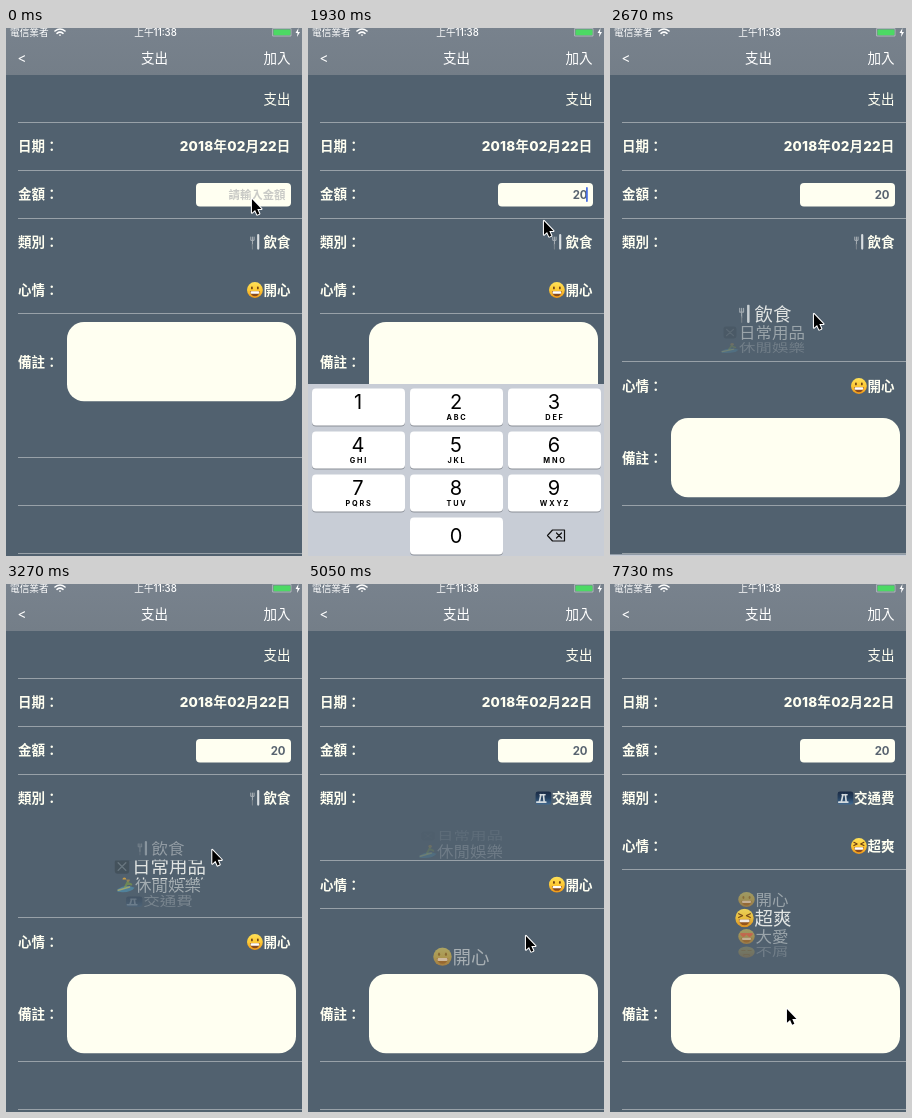
An HTML page with a canvas for the animation above (8 s loop, 296x528 px).

```html
<!DOCTYPE html>
<html lang="zh-Hant">
<head>
<meta charset="utf-8">
<title>支出</title>
<style>
  html, body { margin: 0; width: 100%; height: 100%; overflow: hidden; background: #51616f; }
  canvas { display: block; width: 296px; height: 528px; }
</style>
</head>
<body>
<canvas id="stage"></canvas>
<script>
const W = 296, H = 528, LOOP = 8000, TICK = 148.65;
const ROW = 48, OPEN = 2 * ROW, RIGHT = 284.5, SIZE = 13.5;
const IVORY = '#fffff1', BODY = '#51616f', LINE = '#98a1a8', BROWN = '#6b3d14';
const FONT = 'Inter, "Noto Sans CJK TC", "Noto Sans CJK", sans-serif';
const stage = document.getElementById('stage');
const ratio = window.devicePixelRatio || 1;
stage.width = W * ratio;
stage.height = H * ratio;
const c = stage.getContext('2d');

const categories = [['cutlery', '飲食'], ['goods', '日常用品'], ['surf', '休閒娛樂'], ['transit', '交通費'], ['plane', '旅遊']];
const moods = [['smile', '開心'], ['laugh', '超爽'], ['love', '大愛'], ['meh', '不屑']];

// Pointer legs: first tick, last tick, x, y.
const legs = [
  [11, 15, 225, 214], [16, 18, 203, 285], [19, 26, 209, 234], [27, 31, 217, 351],
  [35, 38, 197, 350], [39, 42, 197, 331], [45, 48, 190, 386], [49, 52, 176, 424]
];

function ease(k, from, to) {
  const f = Math.min(1, Math.max(0, (k - from) / (to - from)));
  return f * f * (3 - 2 * f);
}

function text(s, x, y, size = SIZE, { weight = 600, align = 'left', color = IVORY, spacing = 0 } = {}) {
  c.font = `${weight} ${size}px ${FONT}`;
  c.letterSpacing = spacing + 'px';
  c.textAlign = align;
  c.fillStyle = color;
  c.fillText(s, x, y + size * .37);
}

function box(x, y, w, h, r, color) {
  c.fillStyle = color;
  c.beginPath();
  c.roundRect(x, y, w, h, r);
  c.fill();
}

function stroke(d, color, width) {
  c.strokeStyle = color;
  c.lineWidth = width;
  c.lineCap = c.lineJoin = 'round';
  c.stroke(new Path2D(d));
}

function shape(d, color) {
  c.fillStyle = color;
  c.fill(new Path2D(d));
}

function disc(x, y, rx, ry, color) {
  c.fillStyle = color;
  c.beginPath();
  c.ellipse(x, y, rx, ry, 0, 0, Math.PI * 2);
  c.fill();
}

function fade(y0, y1, ...colors) {
  const g = c.createLinearGradient(0, y0, 0, y1);
  colors.forEach((color, i) => g.addColorStop(i / (colors.length - 1), color));
  return g;
}

function placed(x, y, sx, sy, paint) {
  c.save();
  c.translate(x, y);
  c.scale(sx, sy);
  paint();
  c.restore();
}

function clipped(y, h, paint) {
  if (h <= 0) return;
  c.save();
  c.beginPath();
  c.rect(0, y, W, h);
  c.clip();
  paint();
  c.restore();
}

// Draws one eye, mirrored for the other side.
function face(eye, happy = true) {
  disc(0, 0, .96, .96, fade(-1, 1, '#ffe25a', '#fdc935', '#ee9417'));
  for (const side of [-1, 1]) placed(side * .36, -.25, side, 1, eye);
  if (!happy) return stroke('M-.35 .5Q0 .3 .35 .5', BROWN, .15);
  shape('M-.6 .15H.6Q.5 .75 0 .75T-.6 .15Z', '#8a4a1c');
  box(-.52, .15, 1.04, .3, .1, '#fff');
}

// Every icon fits the square from -1 to 1.
const icons = {
  smile: () => face(() => disc(0, 0, .11, .18, BROWN)),
  laugh: () => face(() => stroke('M.25 -.2L-.15 0L.25 .2', BROWN, .13)),
  love: () => face(() => shape('M0 .35Q-.8 -.3 0 -.2Q.8 -.3 0 .35Z', '#e8343f')),
  meh: () => face(() => stroke('M-.2 0H.2', BROWN, .15), false),
  cutlery() {
    stroke('M-.5 -.6V-.2H-.1V-.6M-.3 -.6V.4', '#aab2b8', .12);
    stroke('M-.3 .3V.85', '#78828a', .14);
    stroke('M.4 -.85V.8', '#d9dee1', .26);
  },
  goods() {
    box(-.75, -.75, 1.5, 1.5, .3, '#42505b');
    stroke('M-.4 -.4L.4 .4M.4 -.4L-.4 .4', '#6f7d86', .14);
  },
  surf() {
    shape('M-1 .5Q0 -.2 1 .3Q.5 1 -1 .8Z', '#4fa3c7');
    stroke('M-.9 .6L.4 .2', '#e8c84b', .2);
    stroke('M.2 -.4L-.1 .2M.2 -.3L.6 -.1', '#8fae3e', .26);
    disc(.25, -.65, .2, .2, '#d9a441');
  },
  transit() {
    box(-.95, -.8, 1.9, 1.6, .3, fade(-.8, .8, '#1b2b45', '#24405f', '#426a90'));
    stroke('M-.4 -.4H.2M-.3 -.4L-.5 .5M0 -.4L.1 .5M-.8 .5H.3', '#d3dade', .2);
  },
  plane() {
    c.rotate(Math.PI / 4);
    stroke('M0 -.8V.8', '#b5d5e4', .3);
    shape('M0 -.35L.95 .4L0 .2L-.95 .4Z', '#8fc0da');
    stroke('M-.3 .85H.3', '#8fc0da', .15);
  }
};

const icon = (name, x, y, size) => placed(x, y, size / 2, size / 2, icons[name]);

function picker(items, scroll, top, height) {
  const mid = top + ROW, band = 9.5, radius = 47, step = .405;
  const drum = (size, opacity) => items.forEach(([name, label], i) => {
    const turn = i - scroll, alpha = opacity(Math.abs(turn));
    if (alpha <= 0) return;
    const em = size * 1.08, left = 153 - (em + size * label.length) / 2;
    placed(left, mid + radius * Math.sin(turn * step), 1, Math.cos(turn * step), () => {
      c.globalAlpha *= alpha;
      icon(name, em / 2, 0, em * .96);
      text(label, em, 0, size, { weight: 400, color: '#f5f6f2' });
    });
  });
  const outer = () => drum(16.5, turn => .7 - .25 * turn);
  clipped(top, height, () => {
    c.globalAlpha = height / OPEN;
    clipped(top, ROW - band, outer);
    clipped(mid + band, ROW - band, outer);
    clipped(mid - band, band * 2, () => drum(18.5, () => .88));
  });
}

function rule(y) {
  c.fillStyle = LINE;
  c.fillRect(12, Math.round(y), W - 12, 1);
}

function choice([name, label], y) {
  icon(name, RIGHT - label.length * SIZE - 8.6, y, 16.5);
  text(label, RIGHT, y, SIZE, { align: 'right' });
}

function header() {
  const style = { color: '#fff', weight: 400 };
  c.fillStyle = fade(0, 47, '#78828d', '#747e88');
  c.fillRect(0, 0, W, 47);
  text('電信業者', 4, 4.5, 9.7, style);
  text('上午11:38', 149.5, 4.5, 9.7, { ...style, weight: 500, align: 'center' });
  stroke('M49 3Q54 -1 59 3M51 5.3Q54 3 57 5.3M54 7V7.2', '#fff', 1.6);
  stroke('M267 .5H285V8H267Z', '#b9c0c5', .8);
  box(267.5, 1.4, 17, 5.8, 1, '#4cd964');
  shape('M292.5 0L289.5 5H291.5L291 9L294 4H292Z', '#fff');
  text('<', 11.5, 30, SIZE, style);
  text('支出', 148.5, 30, SIZE, { ...style, weight: 500, align: 'center' });
  text('加入', RIGHT, 30, SIZE, { ...style, align: 'right' });
}

function amount(k) {
  box(190, 155, 95, 23.5, 4, IVORY);
  const typed = '20'.slice(0, (k >= 5) + (k >= 8));
  text(typed || '請輸入金額', 279.5, 166.5, 11.4,
    { align: 'right', weight: 700, color: typed ? '#596470' : '#c9cac6' });
  if (k > 0 && k < 15) box(278, 159, 1.8, 15, .9, '#4a6fe3');
}

function keyboard(top) {
  c.fillStyle = '#c8cdd6';
  c.fillRect(0, top, W, H);
  const key = (i, digit, word) => {
    const x = 4 + i % 3 * 98, y = top + 4.5 + Math.floor(i / 3) * 43;
    const ink = { align: 'center', color: '#000' };
    box(x, y + 1, 93, 37, 4, '#8b9098');
    box(x, y, 93, 37, 4, '#fff');
    text(digit, x + 46, y + (digit ? 13 : 18), 20, { ...ink, weight: 400 });
    text(word, x + 47, y + 28.5, 7.3, { ...ink, weight: 700, spacing: 1.8 });
  };
  ['', 'ABC', 'DEF', 'GHI', 'JKL', 'MNO', 'PQRS', 'TUV', 'WXYZ'].forEach((word, i) => key(i, String(i + 1), word));
  key(10, '', '');
  text('0', 148, top + 151.5, 20, { weight: 400, align: 'center', color: '#000' });
  placed(248.5, top + 151.5, 1, 1, () =>
    stroke('M-9 0L-4 -5.5H8V5.5H-4ZM0 -2.5L5 2.5M5 -2.5L0 2.5', '#111', 1.2));
}

function pointer(k) {
  let x = 245, y = 170;
  for (const [from, to, nextX, nextY] of legs) {
    const f = ease(k, from, to);
    x += (nextX - x) * f;
    y += (nextY - y) * f;
  }
  const arrow = 'M1 1V15.5L4.3 12.5L6.5 17.5L8.8 16.5L6.6 11.5H11Z';
  placed(x, y, .95, .95, () => {
    stroke(arrow, '#fff', 2.2);
    shape(arrow, '#000');
  });
}

function draw(time) {
  const k = Math.floor((time + 14) / TICK);
  const swap = ease(k, 32.7, 35);
  const catOpen = OPEN * (ease(k, 15.7, 18) - swap), moodOpen = OPEN * swap;
  const shift = catOpen + moodOpen;
  c.setTransform(ratio, 0, 0, ratio, 0, 0);
  c.fillStyle = BODY;
  c.fillRect(0, 0, W, H);
  header();

  for (let i = 0; i < 3; i++) {
    rule(94 + i * ROW);
    rule(429 + i * ROW + shift);
  }
  if (catOpen > 0) rule(237 + catOpen);
  if (catOpen < OPEN) rule(285 + catOpen);
  if (shift > 0) rule(381 + shift);

  const moodY = 262 + catOpen;
  text('支出', RIGHT, 71, SIZE, { weight: 500, align: 'right' });
  text('2018年02月22日', RIGHT, 118.5, SIZE, { weight: 800, align: 'right', spacing: .2 });
  ['日期', '金額', '類別'].forEach((label, i) => text(label + '：', 12, 118.3 + i * ROW));
  text('心情：', 12, moodY);
  text('備註：', 12, 334 + shift);
  amount(k);
  choice(categories[k < 28 ? 0 : 3], 214);
  choice(moods[k < 50 ? 0 : 1], moodY);
  picker(categories, 3 * ease(k, 19, 26), 238, catOpen);
  picker(moods, (ease(k, 39, 42) + ease(k, 43, 46)) / 2, 286 + catOpen, moodOpen);
  box(61, 294 + shift, 229, 79.3, 17, IVORY);

  keyboard(H - 172 * (ease(k, 0, 4) - ease(k, 14.6, 18.2)));
  pointer(k);
}

const start = performance.now();
function tick() {
  draw((performance.now() - start) % LOOP);
  requestAnimationFrame(tick);
}
tick();
</script>
</body>
</html>
```
